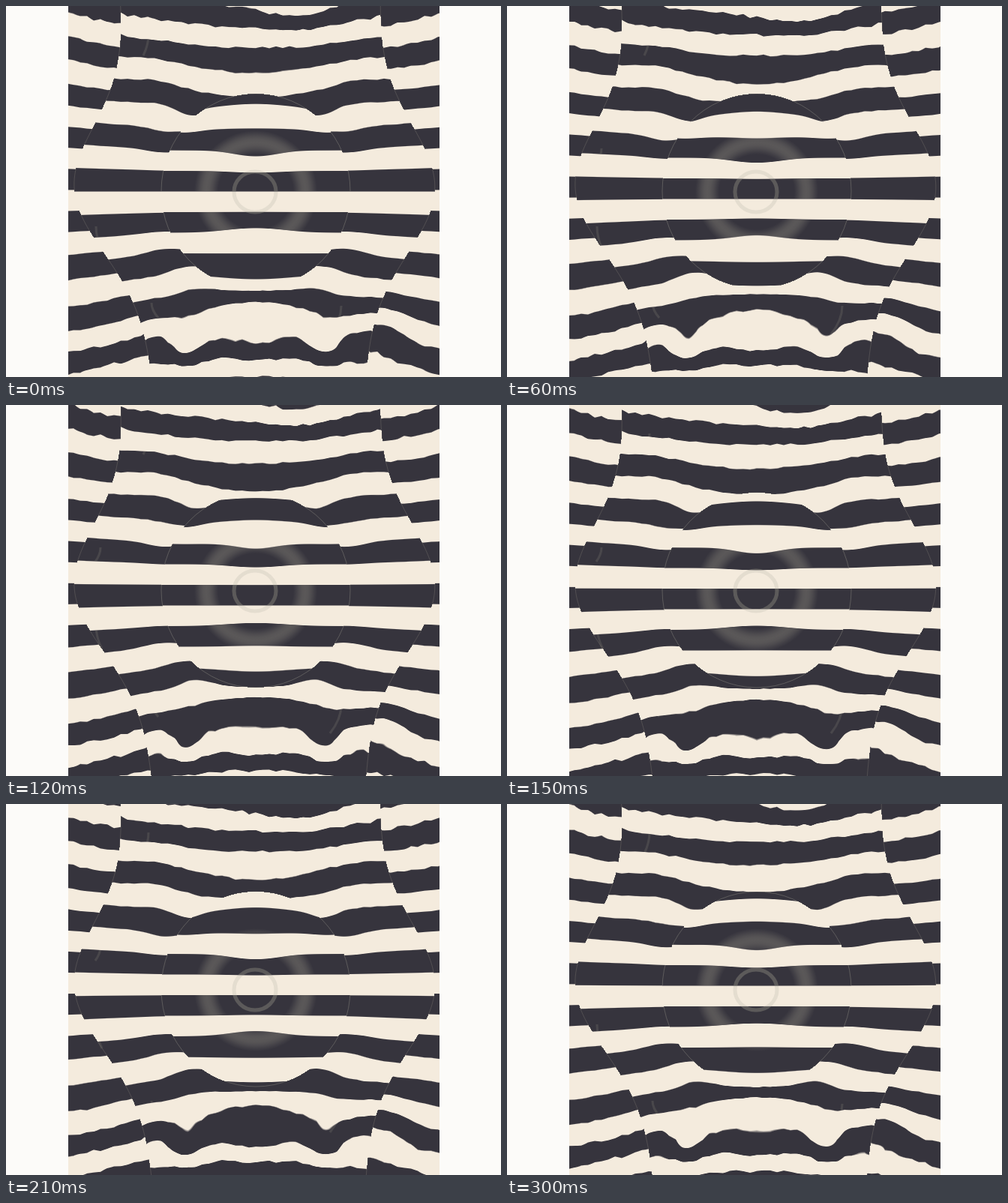
These frames come from a looping animation (660 px wide and 495 px high, 330 ms). An HTML page with a canvas:

```html
<!DOCTYPE html>
<html lang="en">
<head>
<meta charset="utf-8">
<title>Stripes over a folded surface</title>
<style>
  html, body { margin: 0; width: 100%; height: 100%; overflow: hidden; background: #fcfbf9; }
  canvas { display: block; }
</style>
</head>
<body>
<canvas id="stage" width="660" height="495"></canvas>
<script>
const ctx = document.getElementById("stage").getContext("2d");
const LEFT = 83, W = 495, H = 495;
const STEP = 30, STEPS = 11;
const BAND = 27.5, FIRST_EDGE = 0;
const CREAM = [244, 235, 221], DARK = [54, 52, 61];
const DISC = { x: 333, y: 247, rx: 126, ry: 130 };

const clamp = (v, lo, hi) => Math.min(hi, Math.max(lo, v));
const lerp = (a, b, f) => a + (b - a) * f;

function hash(i, j) {
  const s = Math.sin(i * 127.1 + j * 311.7) * 43758.5453;
  return s - Math.floor(s);
}
function noise(x, y) {
  const i = Math.floor(x), j = Math.floor(y), f = x - i, g = y - j;
  return lerp(lerp(hash(i, j), hash(i + 1, j), f),
    lerp(hash(i, j + 1), hash(i + 1, j + 1), f), g) - 0.5;
}

const hill = (x, y, cx, cy, rx, ry, rise) =>
  rise * Math.exp(-(((x - cx) / rx) ** 2) - ((y - cy) / ry) ** 2);

// Outer fold: wide at mid height, narrowing towards the top and bottom.
function foldX(y, side) {
  const half = 172 - 0.06 * y + 83 * Math.exp(-(((y - 245) / 120) ** 2));
  return lerp(326, 337, y / H) + side * half;
}

const inDisc = (x, y) => Math.hypot((x - DISC.x) / DISC.rx, (y - DISC.y) / DISC.ry) < 1;

// Vertical displacement of the stripes on the raised disc.
function discShift(x, y) {
  const d = Math.abs(x - DISC.x);
  return hill(d, y, 0, 135, 60, 25, -7)
    + hill(d, y, 95, 150, 25, 22, 8)
    + hill(d, y, 0, 200, 42, 20, 8)
    + hill(d, y, 0, 302, 50, 15, -7)
    + hill(d, y, 0, 365, 75, 20, 7);
}

// Vertical displacement of the sheet behind it: a fan with a few hills.
function sheetShift(x, y) {
  const d = Math.abs(x - DISC.x);
  const fan = 34 * (y - DISC.y) / 247 * (d / 247) ** 2;
  const outside = x < foldX(y, -1) || x > foldX(y, 1);
  const step = outside ? clamp((230 - y) * 0.12, -10, 14) : 0;
  const rough = 5 * Math.min(1, ((y - 248) / 220) ** 2) * noise(x / 9, y / 14);
  return fan + step + rough
    + hill(x, y, 390, 8, 60, 25, 15)
    + hill(d, y, 0, 112, 85, 30, 13)
    + hill(d, y, 85, 145, 25, 18, 9)
    + hill(d, y, 122, 180, 30, 25, 7)
    + hill(d, y, 135, 95, 40, 50, -6)
    + hill(d, y, 122, 325, 35, 25, -8)
    + hill(d, y, 80, 358, 35, 25, -13)
    + hill(d, y, 0, 368, 40, 12, 10)
    + hill(d, y, 0, 400, 80, 24, -18)
    + hill(d, y, 92, 455, 24, 28, 19)
    + hill(d, y, 0, 455, 45, 18, 10)
    + hill(d, y, 130, 445, 22, 24, -8)
    + hill(x, y, 500, 428, 35, 35, -16)
    + hill(x, y, 115, 420, 60, 50, 7);
}

const phase = new Float32Array(W * H);
for (let py = 0; py < H; py++) {
  for (let px = 0; px < W; px++) {
    const x = LEFT + px + 0.5, y = py + 0.5;
    const shift = inDisc(x, y) ? discShift(x, y) : sheetShift(x, y);
    phase[py * W + px] = (y - shift - FIRST_EDGE) / BAND;
  }
}

const image = ctx.createImageData(W, H);
function paintStripes(step) {
  const travel = 2 * step / STEPS;
  for (let k = 0; k < W * H; k++) {
    const v = (((phase[k] - travel) % 2) + 2) % 2;
    const depth = v < 1 ? Math.min(v, 1 - v) : -Math.min(v - 1, 2 - v);
    const ink = clamp(0.5 + depth * BAND, 0, 1);
    for (let c = 0; c < 3; c++) image.data[k * 4 + c] = lerp(CREAM[c], DARK[c], ink);
    image.data[k * 4 + 3] = 255;
  }
  ctx.putImageData(image, LEFT, 0);
}

function strokeEllipse(x, y, rx, ry, width, alpha) {
  ctx.lineWidth = width;
  ctx.globalAlpha = alpha;
  ctx.beginPath();
  ctx.ellipse(x, y, rx, ry, 0, 0, Math.PI * 2);
  ctx.stroke();
}

function strokeFold(side) {
  ctx.lineWidth = 1;
  ctx.globalAlpha = 0.4;
  ctx.beginPath();
  for (let y = 0; y <= H; y += 5) ctx.lineTo(foldX(y, side), y);
  ctx.stroke();
}

function strokeCrease(x1, y1, x2, y2) {
  ctx.lineWidth = 3;
  ctx.globalAlpha = 0.3;
  ctx.beginPath();
  ctx.moveTo(x1, y1);
  ctx.quadraticCurveTo(x1, (y1 + y2) / 2, x2, y2);
  ctx.stroke();
}

const halo = ctx.createRadialGradient(333, 248, 50, 333, 248, 82);
const haloAlpha = f => 0.65 * Math.sin(Math.PI * f) ** 1.2;
for (let f = 0; f <= 1; f += 0.125) halo.addColorStop(f, `rgba(110,107,103,${haloAlpha(f).toFixed(3)})`);

// Shine lightens the dark stripes only.
function paintShine() {
  ctx.save();
  ctx.globalCompositeOperation = "lighten";
  ctx.fillStyle = halo;
  ctx.fillRect(250, 165, 166, 166);
  ctx.strokeStyle = "#77746f";
  strokeEllipse(DISC.x, DISC.y, DISC.rx, DISC.ry, 1, 0.6);
  strokeFold(-1);
  strokeFold(1);
  strokeCrease(190, 38, 183, 66);
  strokeCrease(120, 294, 128, 326);
  strokeCrease(126, 190, 119, 209);
  strokeCrease(194, 396, 203, 416);
  strokeCrease(447, 400, 432, 438);
  strokeEllipse(332, 248, 28, 27, 5, 0.55);
  ctx.globalCompositeOperation = "source-over";
  strokeEllipse(332, 248, 28, 27, 5, 0.12);
  ctx.restore();
}

let shown = -1;
function frame() {
  const step = Math.floor(performance.now() / STEP) % STEPS;
  if (step !== shown) {
    shown = step;
    paintStripes(step);
    paintShine();
  }
  requestAnimationFrame(frame);
}
frame();
</script>
</body>
</html>
```
